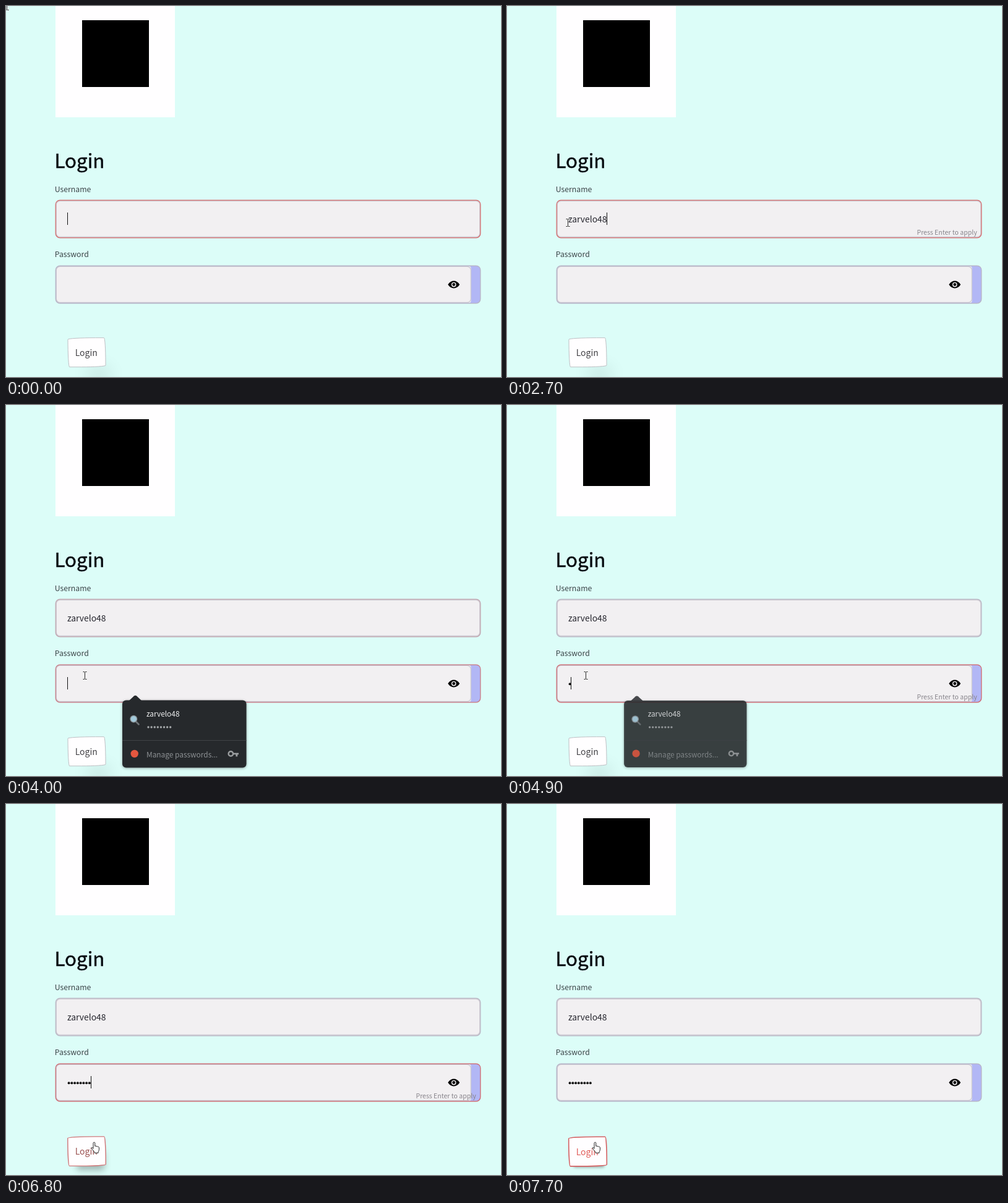
An HTML page with a canvas that plays this animation: 800 by 600 pixels, repeating every 8 s.

```html
<!DOCTYPE html>
<html lang="en">
<head>
<meta charset="utf-8">
<title>Login</title>
<style>
html, body { margin: 0; width: 100%; height: 100%; overflow: hidden; background: #dcfdf8; }
canvas { display: block; }
</style>
</head>
<body>
<canvas id="stage" width="800" height="600"></canvas>
<script>
const c = document.getElementById('stage').getContext('2d');
const LOOP = 8000, STEP = 100;
const SANS = '"Noto Sans CJK SC", "Noto Sans CJK JP", "Noto Sans CJK", "Noto Sans", sans-serif';
const USER = 'zarvelo48';
const GREY = [184, 180, 194], RED = [212, 98, 100];
const INK = [65, 64, 68], HOT = [224, 92, 88];

// [time, characters typed]
const userKeys = [[500, 1], [600, 2], [1000, 3], [1200, 5], [1400, 6], [1600, 7], [2400, 8], [2700, 9]];
const passKeys = [[4900, 1], [5000, 2], [5100, 3], [5300, 4], [5400, 5], [5500, 6], [5600, 7], [5700, 8]];

const ramp = (t, a, b) => Math.min(1, Math.max(0, (t - a) / (b - a)));
const smooth = p => p * p * (3 - 2 * p);
const lerp = (a, b, p) => a + (b - a) * p;
const mix = (a, b, p) => `rgb(${a.map((v, i) => Math.round(lerp(v, b[i], p)))})`;
const within = (t, ...spans) => spans.some(([a, b]) => t >= a && t < b);
const typed = (keys, t) => keys.reduce((n, [at, count]) => t >= at ? count : n, 0);

function text(s, x, y, size, color, weight = 400) {
  c.font = `${weight} ${size}px ${SANS}`;
  c.fillStyle = color;
  c.fillText(s, x, y);
  return c.measureText(s).width;
}

// Medium weight thickened to a semibold
function heading(s, x, y, size, color) {
  text(s, x, y, size, color, 500);
  c.strokeStyle = color;
  c.lineWidth = 0.5;
  c.lineJoin = 'round';
  c.strokeText(s, x, y);
  c.lineJoin = 'miter';
}

function box(x, y, w, h, r, fill, line, width = 1) {
  c.beginPath();
  c.roundRect(x, y, w, h, r);
  if (fill) { c.fillStyle = fill; c.fill(); }
  if (line) { c.strokeStyle = line; c.lineWidth = width; c.stroke(); }
}

function dot(x, y, r, color) {
  c.beginPath();
  c.arc(x, y, r, 0, 7);
  c.fillStyle = color;
  c.fill();
}

function line(color, width, ...pts) {
  c.beginPath();
  pts.forEach(([x, y], i) => i ? c.lineTo(x, y) : c.moveTo(x, y));
  c.strokeStyle = color;
  c.lineWidth = width;
  c.stroke();
}

function path(d, x, y, scale, fill, stroke) {
  const p = new Path2D(d);
  c.save();
  c.translate(x, y);
  c.scale(scale, scale);
  c.fillStyle = fill;
  c.fill(p, 'evenodd');
  if (stroke) { c.strokeStyle = stroke; c.lineWidth = 1; c.stroke(p); }
  c.restore();
}

function field(y, focus, strip) {
  box(80, y, 687, 61, 7, strip ? '#b2b7f5' : '#f2f0f2');
  if (strip) box(81, y + 1, 670.5, 59, [6, 3, 3, 6], '#f2f0f2');
  box(81.3, y + 1.3, strip ? 670 : 684.4, 58.2, 6, null, '#cbc9d1', 1.3);
  box(80.2, y + 0.1, 686.6, 60.7, 7, null, mix(GREY, RED, focus), 1.2);
}

function caret(x, y) {
  c.fillStyle = '#111';
  c.fillRect(Math.floor(x), y, 1, 20);
}

const hint = y => text('Press Enter to apply', 662.5, y, 10.5, '#87848b');

function eye() {
  path('M12 5.1C8 5.1 4 7.3 1 12 4 16.7 8 18.9 12 18.9S20 16.7 23 12C20 7.3 16 5.1 12 5.1Z' +
    'M16.5 12A4.5 4.5 0 1 1 7.5 12 4.5 4.5 0 1 1 16.5 12Z', 713.4, 440.2, 0.86, '#000');
  dot(723.7, 450.5, 2.4, '#000');
}

function page(t) {
  c.fillStyle = '#dcfdf8';
  c.fillRect(0, 0, 800, 600);
  c.fillStyle = '#fffeff';
  c.fillRect(80, 0, 193, 180);
  c.fillStyle = '#000';
  c.fillRect(123, 23, 108, 108);

  heading('Login', 78.5, 262, 31.3, '#060b10');
  text('Username', 78.8, 301, 12.25, '#3a4347');
  text('Password', 78.8, 406.3, 12.25, '#3a4347');

  const moved = ramp(t, 3850, 4050);
  const left = ramp(t, 7050, 7300);
  field(314, 1 - moved, false);
  field(420, moved - left, true);
  eye();

  const w = text(USER.slice(0, typed(userKeys, t)), 99, 350, 13.9, '#26262e');
  if (within(t, [0, 2100], [2400, 3200], [3700, 4000])) caret(99 + w, 334);
  if (within(t, [500, 4000])) hint(369.5);

  const n = typed(passKeys, t);
  for (let i = 0; i < n; i++) dot(101.6 + i * 4.75, 451.3, 1.95, '#111');
  if (within(t, [4000, 4500], [4900, 6200], [6700, 7100])) caret(99.2 + n * 4.75, 440);
  if (within(t, [4900, 7100])) hint(475.5);
}

function button(t) {
  const raw = ramp(t, 6650, 6950), p = raw * (2 - raw);
  const x = lerp(100, 99.7, p), y = lerp(536.6, 538.3, p), w = lerp(61, 61.6, p), h = lerp(47.2, 47.6, p);
  const spread = lerp(16, 6, p), far = 2000;
  c.save();
  c.shadowColor = `rgba(0,0,0,${lerp(0.2, 0.3, p)})`;
  c.shadowBlur = lerp(30, 4, p);
  c.shadowOffsetX = far + lerp(19, 2, p);
  c.shadowOffsetY = lerp(37, 8, p);
  box(x - far + spread, y + spread, w - 2 * spread, h - 2 * spread, 3, '#000');
  c.restore();
  const corners = [[255, 15], [15, 225], [225, 15], [15, 255]].map(([x, y]) => ({ x, y }));
  box(x, y, w, h, corners, '#fffeff', mix([190, 192, 196], RED, p), lerp(1, 1.6, p));
  text('Login', 111.7, lerp(565.7, 568, p), 13.95, mix(INK, HOT, p * p));
}

function popup(t) {
  if (!within(t, [4000, 5100])) return;
  const gone = ramp(t, 4850, 5080);
  c.save();
  c.globalAlpha = t < 4900 ? 1 : lerp(0.84, 0.3, ramp(t, 4900, 5000));
  c.translate(288, 532);
  c.scale(1 - gone * 0.05, 1 - gone * 0.05);
  c.translate(-288, -532);

  c.save();
  c.shadowColor = 'rgba(0,0,0,.35)';
  c.shadowBlur = 4;
  c.shadowOffsetY = 1;
  box(188, 477.5, 200.5, 109, 6, '#26292c');
  c.restore();
  path('M-10 0L-2 -7.5Q0 -9 2 -7.5L10 0Z', 209, 478, 1, '#26292c');
  line('#404346', 1, [188, 542.5], [388.5, 542.5]);

  c.lineCap = 'round';
  line('#6f7478', 2.6, [210.5, 512.5], [214.5, 516.5]);
  dot(206.3, 507.8, 6, '#8b9499');
  dot(206.3, 507.8, 4.6, '#a3cbdc');
  dot(207.7, 564, 6.2, '#e4573f');

  text(USER, 227, 504, 11.9, '#f1f2f3');
  for (let i = 0; i < 8; i++) dot(230 + i * 5.1, 521, 1.7, '#a6a9ab');
  text('Manage passwords...', 227, 570, 11.9, '#8d9194');

  c.lineCap = 'butt';
  c.beginPath();
  c.arc(363.3, 564, 3.7, 0, 7);
  c.strokeStyle = '#9a9d9f';
  c.lineWidth = 2.4;
  c.stroke();
  line('#9a9d9f', 2.6, [367, 564], [376, 564]);
  line('#9a9d9f', 2.8, [372.8, 564], [372.8, 568.5]);
  c.restore();
}

function beam(x, y) {
  for (const [color, w] of [['rgba(255,255,255,.7)', 2.4], ['#222', 1]]) {
    line(color, w, [x, y - 5.5], [x, y + 5.5]);
    for (const s of [-6, 6]) {
      line(color, w, [x - 3, y + s], [x - 0.5, y + s]);
      line(color, w, [x + 0.5, y + s], [x + 3, y + s]);
    }
  }
}

function pointer(t) {
  if (t < 100) return beam(1.5, 0.5);
  const a = smooth(ramp(t, 3100, 3800)), b = ramp(t, 6400, 6700);
  const x = Math.round(lerp(lerp(98, 127, a), 144, b)) + 0.5;
  const y = Math.round(lerp(lerp(350, 437, a), 556, b)) + 0.5;
  if (b === 1) {
    path('M1 10V2.2Q1 .8 2.4 .8T3.8 2.2V7Q5.2 6.2 6 7.4Q7.5 6.7 8.2 8Q9.8 7.4 10.4 9V13Q10 15 9 16.5V18' +
      'H3V16.5L-1.2 11.6Q-2.6 9.6 -1.4 9.2Q-.4 9 1 11Z', 140, 546.3, 1, '#fff', '#222');
  } else if (y > 481) {
    path('M0 0V14L3.2 11L5.4 16L7.6 15L5.4 10.2H9.8Z', x, y - 6, 1, '#fff', '#222');
  } else {
    beam(x, y);
  }
}

function draw(t) {
  page(t);
  button(t);
  popup(t);
  pointer(t);
}

const start = performance.now();
function tick(now) {
  const t = Math.max(0, now - start) % LOOP;
  draw(Math.floor(t / STEP) * STEP);
  requestAnimationFrame(tick);
}
draw(0);
requestAnimationFrame(tick);
</script>
</body>
</html>
```
